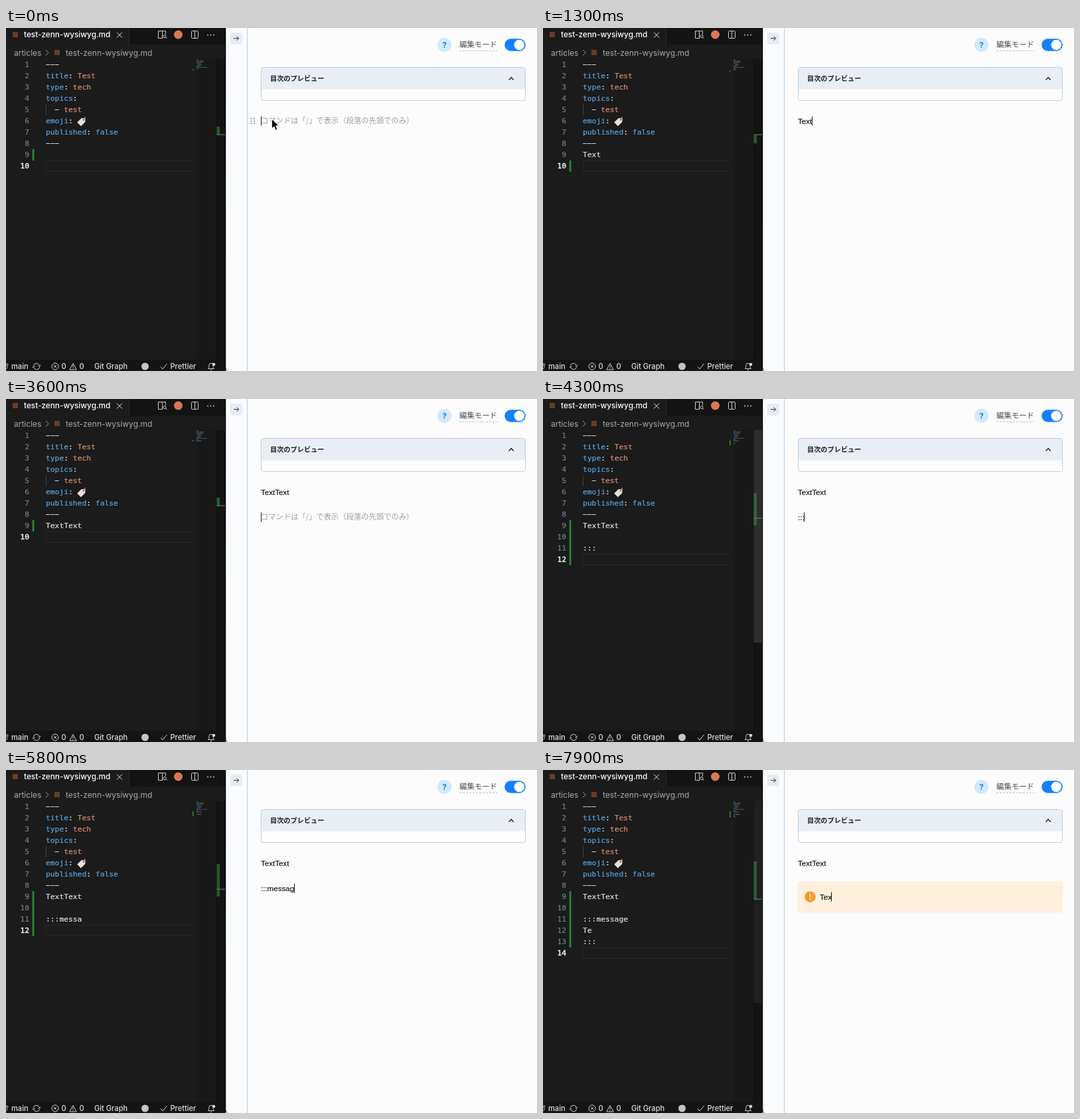
Write an HTML page that moves like this. It is 800 by 518 pixels and loops after 8000 ms.

```html
<!DOCTYPE html>
<html lang="ja">
<head>
<meta charset="utf-8">
<title>Markdown sync</title>
<style>
html, body { margin: 0; width: 100%; height: 100%; overflow: hidden; background: #fcfcfc; }
svg { display: block; width: 100vw; height: 100vh; }
text { white-space: pre; }
.code { font: 11.3px "DejaVu Sans Mono", monospace; fill: #dedede; stroke: #dedede; stroke-width: .22; }
.num { text-anchor: end; fill: #767c84; stroke: #767c84; }
.now { fill: #ececec; stroke: #ececec; stroke-width: .5; }
.key { fill: #56a4e2; stroke: #56a4e2; }
.val { fill: #d48f70; stroke: #d48f70; }
.ui { font: 12px Inter, sans-serif; fill: #a9a9a9; }
.tab { font-size: 11.8px; font-weight: 500; fill: #fff; }
.bar { font: 500 11.1px Inter, sans-serif; fill: #dedede; }
.jp { font: 11.3px "Noto Sans CJK JP", "Noto Sans CJK", sans-serif; fill: #9c9fa4; }
.doc { font: 11.55px "Liberation Sans", Arial, sans-serif; fill: #111; stroke: #111; stroke-width: .15; }
.icon { fill: none; stroke: #cfcfcf; stroke-width: 1; }
</style>
</head>
<body>
<svg viewBox="0 0 800 518" preserveAspectRatio="none">
  <rect width="331" height="518" fill="#1b1b1b"/>
  <rect x="185" width="146" height="25" fill="#131313"/>
  <path d="M185.5 0V25" stroke="#292929"/>
  <rect x="288" y="47" width="29" height="454" fill="#181818"/>
  <rect x="317" y="47" width="13" height="454" fill="#141414"/>
  <path d="M317.5 47V501" stroke="#0f0f0f"/>
  <rect y="501" width="331" height="17" fill="#141414"/>

  <!-- tab bar -->
  <rect x="10" y="6" width="8" height="8" fill="#6b3c25"/>
  <text class="ui tab" x="27" y="13.600">test-zenn-wysiwyg.md</text>
  <path class="icon" style="stroke:#e6e6e6" d="M167 6.500l8 8m0-8l-8 8"/>
  <g class="icon">
    <path d="M236 15.500h-6.500v-11h11v5M235.500 4.500v11"/>
    <circle cx="239" cy="12.500" r="2"/><path d="M240.500 14l2 2"/>
    <rect x="279.500" y="4.500" width="10" height="11" rx="1"/><path d="M284.500 4.500v11"/>
  </g>
  <circle cx="259.500" cy="10" r="6.500" fill="#d97757"/>
  <g fill="#c4c4c4"><circle cx="304" cy="10.500" r="1"/><circle cx="308.500" cy="10.500" r="1"/><circle cx="313" cy="10.500" r="1"/></g>

  <!-- breadcrumb -->
  <text class="ui" x="12" y="41.500">articles</text>
  <path class="icon" style="stroke:#999" d="M60 33l4 4.300l-4 4.300"/>
  <rect x="73" y="33" width="8" height="8" fill="#6b3c25"/>
  <text class="ui" x="90" y="41.500">test-zenn-wysiwyg.md</text>

  <!-- status bar -->
  <g class="bar">
    <text x="8" y="515">main</text><text x="83.500" y="515">0</text><text x="110.500" y="515">0</text>
    <text x="133" y="515">Git Graph</text><text x="247.500" y="515">Prettier</text>
  </g>
  <g class="icon">
    <path d="M-1 515c3 0 3-3 3-4"/><circle cx="1.500" cy="508.500" r="1.500"/>
    <path d="M41.300 510a4.700 4.700 0 0 1 9-.5M50.700 512a4.700 4.700 0 0 1-9 .5M48.500 510.500l2.300.3l1.200-2M43.500 511.500l-2.300-.3l-1.200 2"/>
    <circle cx="74" cy="511" r="5"/><path d="M72 509l4 4m0-4l-4 4"/>
    <path d="M101 506.500l5.200 9.500h-10.400zM101 509.500v3.200M101 513.800v1"/>
    <path d="M233 511.500l3 3.500l6.500-8"/>
    <path d="M304.500 514.500h9l-1.300-2v-3a3.200 3.200 0 0 0-6.400 0v3zM308 516.500h2"/>
  </g>
  <circle cx="209.500" cy="511" r="5.500" fill="#c4c4c4"/>
  <circle cx="313" cy="508" r="2.300" fill="#d8d8d8"/>

  <!-- code -->
  <path d="M60.500 115V132" stroke="#404040"/>
  <g id="code"></g>
  <g transform="translate(115 140.500) rotate(-45)">
    <path d="M-7 -4h9l4.500 4l-4.500 4h-9z" fill="#e4e0dc"/>
    <path d="M2.500 0l5-1.500" stroke="#c0704c" stroke-width="1.300"/>
    <circle cx="2.500" r="1.100" fill="#a34f3a"/>
  </g>
  <g id="live"></g>

  <!-- preview pane -->
  <path d="M330 0H800V518H335Q330.500 518 330.500 512z" fill="#000"/>
  <path d="M331.500 0H800V518H336Q331.500 518 331.500 512z" fill="#fcfcfc"/>
  <path d="M331.500 0H363V518H336Q331.500 518 331.500 512z" fill="#f9fbfd"/>
  <path d="M363.500 0V518" stroke="#b7cde3"/>
  <rect x="338" y="7" width="17.500" height="17.500" rx="3" fill="#e6ebf3"/>
  <path d="M343 15.700h7.500M347.500 12.500l3.200 3.200l-3.200 3.200" fill="none" stroke="#303030"/>
  <circle cx="660.500" cy="25.500" r="10.700" fill="#d3e9fd"/>
  <text x="660.500" y="29.700" text-anchor="middle" style="font:bold 12px Inter,sans-serif" fill="#1583fb">?</text>
  <text class="jp" x="683" y="28.800" style="font-size:11.400px;font-weight:500;fill:#4c5056">編集モード</text>
  <path d="M683 34.500H740" stroke="#b4c0cc" stroke-dasharray="3 2"/>
  <rect x="751.200" y="16.300" width="31.600" height="18.400" rx="9.200" fill="#1380fc"/>
  <circle cx="773.300" cy="25.500" r="7.800" fill="#fff"/>
  <rect x="384.500" y="59.500" width="398" height="50" rx="3.500" fill="#fdfdfe"/>
  <path d="M384.500 92.500V63a3.500 3.500 0 0 1 3.500-3.500H779a3.500 3.500 0 0 1 3.500 3.500V92.500z" fill="#e9edf4"/>
  <rect x="384.500" y="59.500" width="398" height="50" rx="3.500" fill="none" stroke="#b9d0e6"/>
  <text class="jp" x="398" y="80" style="font-weight:700;font-size:10.200px;fill:#1d1f22">目次のプレビュー</text>
  <path d="M757.500 78.500l3.700-3.900l3.700 3.900" fill="none" stroke="#222" stroke-width="1.400"/>

  <text class="doc" id="para" x="384" y="144.500"></text>
  <g id="box">
    <rect x="384" y="168" width="399" height="47.500" rx="3.500" fill="#fef0dc"/>
    <circle cx="402.500" cy="191.500" r="8.300" fill="#f79d27"/>
    <path d="M402.500 187.300v5M402.500 194.200v1.600" stroke="#fff" stroke-width="1.700"/>
  </g>
  <text class="doc" id="second"></text>
  <text class="jp" id="hint"></text>
  <path id="caret" stroke="#111"/>
  <g id="hover">
    <g id="grip" fill="#8d9196"></g>
    <path d="M400.500 137.500v14.500l3.400-3.200l2.500 5.500l2.600-1.200l-2.500-5.400h4.700z" fill="#000" stroke="#fff" stroke-width=".9"/>
  </g>
</svg>
<script>
const LOOP = 8000, LAG = 150, CH = 6.803;
const $ = id => document.getElementById(id);
const rowY = n => 55.5 + 17 * (n - 1);
const rect = (x, y, w, h, fill, extra = '') =>
  `<rect x="${x}" y="${y}" width="${w}" height="${h}" fill="${fill}" ${extra}/>`;
const code = (x, n, s, cls = '') => `<text class="code ${cls}" x="${x}" y="${rowY(n) + 3.5}">${s}</text>`;
const num = (n, on) => code(35, n, n, on ? 'num now' : 'num');

// front matter: indent, key, mark, value, value class
const head = [
  [0, '', '−−−', ''], [0, 'title', ':', ' Test', 'val'], [0, 'type', ':', ' tech', 'val'],
  [0, 'topics', ':', ''], [2, '', '−', ' test', 'val'], [0, 'emoji', ':', ''],
  [0, 'published', ':', ' false', 'key'], [0, '', '−−−', '']
];
let mini = '';
$('code').innerHTML = head.map(([pad, key, mark, val, cls = ''], i) => {
  const y = 47.5 + i * 1.9, k = key.length + mark.length;
  mini += rect(287 + pad, y, k * .95, 1, key ? '#355f83' : '#666');
  if (val) mini += rect(287 + pad + k, y, val.length * .95, 1, cls == 'val' ? '#7d5a4c' : '#355f83');
  return num(i + 1) + code(60 + pad * CH, i + 1,
    `<tspan class="key">${key}</tspan>${mark}<tspan class="${cls}">${val}</tspan>`);
}).join('');
for (let i = 0; i < 6; i++)
  $('grip').innerHTML += `<circle cx="${369.7 + i % 2 * 4.3}" cy="${136.7 + (i >> 1) * 3.8}" r="1.1"/>`;

// typing bursts: start, interval, field, text
const bursts = [
  [500, 120, 'para', 'Text'], [2000, 120, 'para', 'Text'],
  [3700, 150, 'second', ':::'], [5000, 150, 'second', 'message'], [7500, 150, 'note', 'Text']
];
const ENTER = 3300, BOX = 6400, CLOSE = 6900;

function typed(field, t) {
  return bursts.filter(b => b[2] == field)
    .map(([at, gap, , s]) => s.slice(0, Math.max(0, Math.floor((t - at) / gap) + 1))).join('');
}

function drawCode(t) {
  const s = t - LAG, para = typed('para', s), second = typed('second', s);
  const closed = t >= CLOSE;
  const rows = [para];
  if (second) rows.push('', second);
  if (closed) rows.push(typed('note', s), ':::');
  rows.push('');
  const last = 8 + rows.length;
  // change marks: first row, last row; ruler: top, bottom, cursor
  let marks = [9, 9], ruler = [149, 161, 161];
  if (closed) { marks = [9, 13]; ruler = [138, 195, 195]; }
  else if (second && t >= BOX + LAG) { marks = [9, 11]; ruler = [142, 180, 180]; }
  else if (second) { marks = [9, 12]; ruler = [142, 191, 180]; }
  else if (t >= 1000 && t < 2150) { marks = [10, 10]; ruler = [162, 174, 161]; }

  let out = `<path d="M280 ${rowY(last) - 8}H60.5v16H280" fill="none" stroke="#272727"/>`;
  out += rect(39.7, rowY(marks[0]) - 8.5, 2.7, 17 * (marks[1] - marks[0] + 1), '#2b8a3a');
  out += mini;
  rows.forEach((r, i) => {
    out += num(9 + i, 9 + i == last) + code(60, 9 + i, r);
    if (r) out += rect(287, 47.5 + (8 + i) * 1.9, r.length * .95, 1, '#666');
  });
  out += rect(281, 47 + (marks[0] - 1) * 1.9, 1.6, 1.9 * (marks[1] - marks[0] + 1), '#2b8a3a');

  const shown = closed ? CLOSE : 3850;
  const fade = t < shown ? 0 : Math.max(0, Math.min(1, 1 - (t - shown - 550) / 800));
  out += rect(317.5, ruler[0], 4.5, ruler[1] - ruler[0], '#225c2b');
  out += rect(317.5, 47, 12.5, closed ? 305 : 321, '#666', `opacity="${.33 * fade}"`);
  out += rect(317.5, ruler[2] - .5, 12.5, 1.2, '#5f7865');
  $('live').innerHTML = out;
}

function drawDoc(t) {
  const boxed = t >= BOX, lower = t >= ENTER;
  const para = $('para'), second = $('second'), hint = $('hint');
  para.textContent = typed('para', t);
  second.textContent = boxed ? typed('note', t) : typed('second', t);
  const x = boxed ? 417 : 384, y = lower ? (boxed ? 191.5 : 178.5) : 140.5;
  second.setAttribute('x', x);
  second.setAttribute('y', y + 4);
  const now = lower ? second : para;
  hint.textContent = now.textContent ? '' : boxed ? 'ここに入力' : 'コマンドは「/」で表示（段落の先頭でのみ）';
  hint.setAttribute('x', x);
  hint.setAttribute('y', y + 3.8);
  hint.style.fontSize = boxed ? '10.6px' : '11.3px';
  const cx = x + .5 + (now.textContent ? Math.floor(now.getComputedTextLength()) : 0);
  $('caret').setAttribute('d', `M${cx} ${y - 7}v14`);
  $('box').style.display = boxed ? '' : 'none';
  $('hover').style.display = t < 500 ? '' : 'none';
}

function frame(now) {
  const t = now % LOOP;
  drawCode(t);
  drawDoc(t);
  requestAnimationFrame(frame);
}
frame(0);
</script>
</body>
</html>
```
